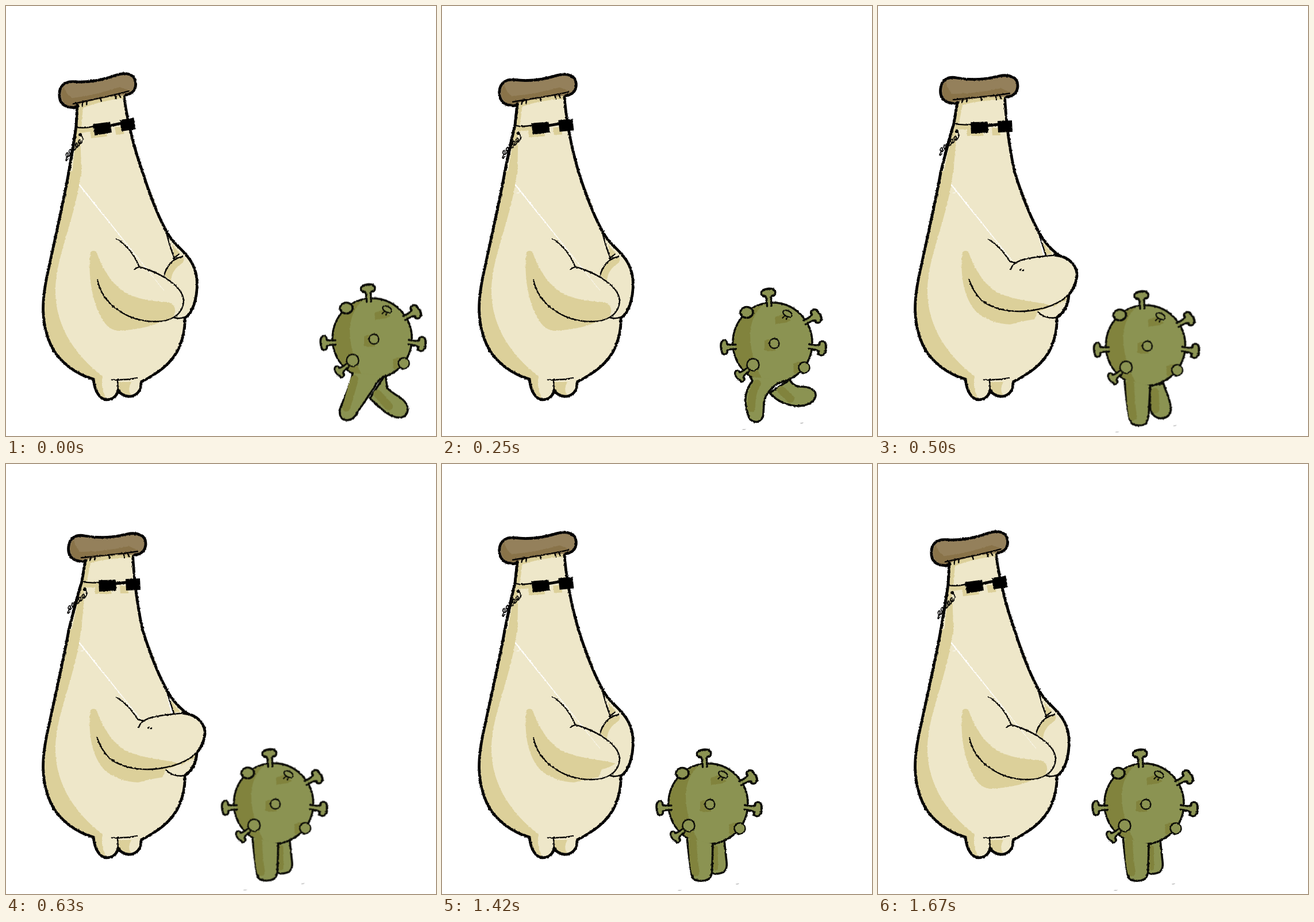
These frames come from a looping animation (748 px wide and 748 px high, 2.29 s). An HTML page without scripts:

```html
<!DOCTYPE html>
<html lang="en">
<head>
<meta charset="utf-8">
<title>Mushroom guard</title>
<style>
html, body { margin: 0; width: 100%; height: 100%; overflow: hidden; background: #fff; }
svg { display: block; width: 100%; height: 100%; }
path, ellipse { stroke-linecap: round; stroke-linejoin: round; }

.skin { fill: #eee7c9; }
.shade { fill: #dcd09a; }
.line { stroke: #050404; stroke-width: 4.8; }
.open { fill: none; }
.thin { fill: none; stroke: #050404; stroke-width: 2.4; }
.germ { fill: #8b9352; stroke: #0d0d08; stroke-width: 3.6; }
.fine { stroke-width: 2.3; }
.dark { fill: #81833d; }
.band { fill: none; stroke: #81833d; stroke-width: 14; }

/* every part switches hard inside one shared loop */
.lean, .mid, .up, .armsDown, .shadeLow, .shadeHigh, .later,
.walk, .stride, .kick, .pass, .step, .stand { animation: 2290ms step-end infinite; }
.lean { animation-name: lean; }
.mid { animation-name: mid; }
.up { animation-name: up; }
.armsDown { animation-name: armsDown; }
.shadeLow { animation-name: shadeLow; }
.shadeHigh { animation-name: shadeHigh; }
.later { animation-name: later; }
.walk { animation-name: walk; }
.stride { animation-name: stride; }
.kick { animation-name: kick; }
.pass { animation-name: pass; }
.step { animation-name: step; }
.stand { animation-name: stand; }

@keyframes lean { 0% { opacity: 1 } 10.917% { opacity: 0 } 69.432%, 100% { opacity: 1 } }
@keyframes mid { 0% { opacity: 0 } 10.917% { opacity: 1 } 16.594% { opacity: 0 } 62.009% { opacity: 1 } 69.432%, 100% { opacity: 0 } }
@keyframes up { 0% { opacity: 0 } 16.594% { opacity: 1 } 62.009%, 100% { opacity: 0 } }
@keyframes armsDown { 0% { opacity: 1 } 16.594% { opacity: 0 } 62.009%, 100% { opacity: 1 } }
@keyframes shadeLow { 0% { opacity: 1 } 16.594% { opacity: 0 } 65.502%, 100% { opacity: 1 } }
@keyframes shadeHigh { 0% { opacity: 0 } 16.594% { opacity: 1 } 65.502%, 100% { opacity: 0 } }
@keyframes later { 0% { opacity: 0 } 5.677%, 100% { opacity: 1 } }
@keyframes walk {
  0% { transform: translate(174px, -12.5px) }
  5.677% { transform: translate(143px, -9px) }
  10.917% { transform: translate(112px, -5px) }
  16.594% { transform: translate(57px, -1.5px) }
  21.834% { transform: translate(2.5px, -.5px) }
  32.751%, 100% { transform: none }
}
@keyframes stride { 0% { opacity: 1 } 5.677%, 100% { opacity: 0 } }
@keyframes kick { 0% { opacity: 0 } 10.917% { opacity: 1 } 16.594%, 100% { opacity: 0 } }
@keyframes pass { 0% { opacity: 0 } 5.677% { opacity: 1 } 10.917% { opacity: 0 } 16.594% { opacity: 1 } 21.834%, 100% { opacity: 0 } }
@keyframes step { 0% { opacity: 0 } 21.834% { opacity: 1 } 27.511%, 100% { opacity: 0 } }
@keyframes stand { 0% { opacity: 0 } 27.511%, 100% { opacity: 1 } }
</style>
</head>
<body>
<svg viewBox="0 0 748 748">
  <defs>
    <filter id="rough" filterUnits="userSpaceOnUse" x="0" y="0" width="748" height="748" color-interpolation-filters="sRGB">
      <feTurbulence type="fractalNoise" baseFrequency=".3" numOctaves="2" seed="4"/>
      <feDisplacementMap in="SourceGraphic" scale="2.8" xChannelSelector="R" yChannelSelector="G"/>
    </filter>
    <clipPath id="ball"><ellipse cx="463" cy="591" rx="67.5" ry="68.5"/></clipPath>
    <path id="spike" d="M-4 4C-4-6-4-8-6-11C-14-10-15-18-10-20C-4-22 6-23 10-20C15-17 13-10 6-11C4-8 4-6 4 4"/>
    <path id="body" d="M109 290C97 355 83 415 73 462C62 512 60 550 78 590C92 620 125 642 152 649C154 668 162 685 176 685C188 684 194 676 195 668C200 677 210 680 218 679C230 676 235 668 235 654C262 640 290 622 302 592C309 575 312 555 311 540"/>
    <path id="flank" d="M238 290C250 328 262 360 277 388"/>

    <g id="head">
      <path class="shade" d="M138 158L133 204L120 262L114 290L131 290L136 230L134 206L141 203L147 172Q180 163 219 163V152Z"/>
      <path class="shade" d="M132 204L161 206V214L136 215ZM155 212H163V221H183V226H155ZM198 212H209V220H213V225H199Z"/>
      <path fill="#94805b" d="M138 166L128 170C112 167 107 155 109 143C111 128 122 122 137 125C165 130 190 127 210 122C229 118 243 124 243 138C243 150 236 157 224 158Q175 158 138 166Z"/>
      <path fill="#897349" d="M118 131C107 145 113 165 127 167Q139 166 147 161Q185 156 220 155L231 151L214 143Q175 152 130 153Q120 145 118 131Z"/>
      <path class="line open" d="M139 168Q134 171 128 169C112 167 107 155 109 143C111 128 122 122 137 125C165 130 190 127 210 122C229 118 243 124 243 138C243 150 236 157 224 158"/>
      <path class="thin" d="M131 163Q150 161 180 158T229 152M148 162l-2 6M155 161l-1 6M179 158l1 6M205 157l1 6M212 156l2 5"/>
      <path class="thin" d="M131 204Q146 208 161 206"/>
      <path class="line open" d="M191 208L209 206"/>
      <path d="M161 202L191 201.500L192 220L162 222ZM208 200L233 199L234 219L209 220Z"/>
      <circle cx="137" cy="218" r="3"/>
      <path class="thin" style="stroke-width:1.800" d="M138 218q5 7 1 12c-2 6-9 3-6-2s5 2 0 7c-2 6-9 3-6-2s5 2 0 7c-2 6-9 3-6-2s5 2 0 7c-2 6-9 3-6-2s5 2 0 7c-2 6-9 3-6-2s5 2 0 7q-3 5-1 5l3-3"/>
    </g>
  </defs>

  <g filter="url(#rough)">
    <path class="skin" d="M109 286H238L277 388L311 540Z"/>
    <use class="skin" href="#body"/>
    <use class="skin" href="#flank"/>

    <g class="lean">
      <path class="skin line" d="M109 290C113 268 118 235 122 211L125 155L204 146C208 185 220 240 238 290"/>
      <use href="#head" transform="rotate(-6.5 187 290)"/>
      <path class="line open" d="M109 290C113 268 118 235 122 211L124 172"/>
    </g>
    <g class="mid">
      <path class="skin line" d="M109 290C114 266 121 230 127 208L133 153L212 148C215 190 224 243 238 290"/>
      <use href="#head" transform="rotate(-3.6 187 290)"/>
      <path class="line open" d="M109 290C114 266 121 230 127 208L131 170"/>
    </g>
    <g class="up">
      <path class="skin line" d="M109 290C116 262 125 225 132 205L141 150H220C223 210 230 255 238 290"/>
      <use href="#head"/>
      <path class="line open" d="M109 290C116 262 125 225 132 205L138 168"/>
    </g>

    <path class="shade" d="M110 288C98 355 84 415 74 462C63 512 61 550 79 590C93 619 126 641 153 648C155 667 162 680 174 683Q164 664 168 644C123 610 86 560 86 496C86 434 122 370 131 284Z"/>
    <path class="shade" d="M195 654H218Q211 666 217 677Q200 678 195 666Z"/>
    <use class="line open" href="#body"/>
    <use class="line open" href="#flank"/>
    <path class="thin" d="M195 669L194 652M184 650Q208 651 228 647"/>
    <path class="later" fill="none" stroke="#fff" d="M132 317h3M130 325h4"/>

    <g class="armsDown">
      <path class="skin" d="M277 388C288 412 303 419 316 436C329 452 334 472 332 494C330 518 322 536 311 543L290 542L270 480Z"/>
      <path class="line open" d="M277 388C288 412 303 419 316 436C329 452 334 472 332 494C330 518 322 536 311 543"/>
      <path class="shade" d="M275 468Q285 441 308 437Q313 444 300 452Q288 462 287 478ZM289 415L302 430L293 437Z"/>
    </g>
    <g class="up">
      <path class="skin line" d="M277 388C287 409 299 422 315 434L300 440"/>
      <path class="shade" d="M284 408L302 430L292 434Z"/>
      <path class="skin" d="M332 502C331 522 322 538 309 542Q290 545 277 531Z"/>
      <path class="thin" d="M309 542Q290 545 277 531"/>
      <path class="shade" d="M305 521L330 505Q328 516 318 516Q310 519 305 525Z"/>
      <path class="line open" d="M332 502C331 520 324 533 312 541"/>
      <path class="skin" d="M231 458C236 440 265 437 315 433C338 438 347 455 346 470C342 495 328 512 305 520C255 537 210 532 180 512Z"/>
      <path class="line open" d="M307 433C336 436 347 455 346 470C343 488 338 496 331 503"/>
    </g>

    <path class="shade shadeLow" d="M147 428Q156 421 160 435C172 467 190 487 207 498C232 512 260 514 282 515Q296 520 294 533L289 545L268 550Q242 562 197 565Q180 565 168 546C150 515 142 470 147 428Z"/>
    <path class="shade shadeHigh" d="M147 428Q156 421 160 435C172 467 190 487 207 498C232 510 260 513 285 517L302 521Q290 529 278 531L272 545Q250 548 230 554Q195 552 172 533C150 510 142 470 147 428Z"/>

    <g class="armsDown">
      <path class="thin" d="M192 405Q217 419 232 454M224 458Q230 452 240 456C275 468 306 488 309 511C309 536 288 549 260 549C215 549 168 522 159 476M275 468Q284 440 307 436M301 431L291 440M278 390Q284 416 293 439M292 542Q303 545 311 541"/>
    </g>
    <g class="up">
      <path class="thin" d="M192 406Q212 417 229 444L239 447M231 458C236 440 265 437 312 433M278 390L292 434M331 503Q315 518 290 525C245 537 205 531 180 512Q166 498 158 475M247 459l2-1M252 460l1 0"/>
    </g>
  </g>

  <g class="walk">
    <g filter="url(#rough)">
      <g class="stride">
        <path class="germ" d="M486 653L489 677C500 688 508 690 516 697C530 710 526 725 514 728C498 731 483 718 459 695Z"/>
        <path class="band" d="M472 687L492 709"/>
      </g>
      <g class="kick">
        <path class="germ" d="M493 655Q498 666 510 667C530 667 539 674 538 684C534 698 514 703 498 700Q474 696 458 678Z"/>
        <path class="band" d="M478 673L494 688"/>
      </g>
      <g class="pass">
        <path class="germ" d="M483 656Q484 671 490 682C503 696 505 706 499 715Q487 720 476 711Q466 700 455 685Z"/>
        <path class="band" d="M467 683L479 698"/>
      </g>
      <g class="step">
        <path class="germ" d="M471 661L494 657C498 672 506 682 507 702C506 713 500 717 491 718Q474 717 471 700Z"/>
        <path class="band" d="M479 672L480 702"/>
      </g>
      <g class="stand">
        <path class="germ" d="M471 661L491 655Q493 673 495 692C497 708 490 713 474 713L469 710Z"/>
        <path class="band" style="stroke-width:8" d="M476 668L476 703"/>
      </g>

      <ellipse class="germ" cx="463" cy="591" rx="69" ry="70"/>
      <g class="dark" clip-path="url(#ball)">
        <path d="M457 515H380V665H452C425 625 415 570 434 540Q441 528 457 515Z"/>
        <path d="M449 587Q457 583 467 585L468 604Q457 607 449 604ZM467 546L482 541L495 552L485 556L468 558ZM499 627L515 623L520 640L500 645Z"/>
      </g>
      <g class="germ">
        <use href="#spike" transform="translate(457 522) rotate(-4) scale(.95 1.15)"/>
        <use href="#spike" transform="translate(523 553) rotate(62) scale(.95 1.15)"/>
        <use href="#spike" transform="translate(531 598) rotate(98) scale(.95 1.15)"/>
        <use href="#spike" transform="translate(395 598) rotate(-92) scale(.95 1)"/>
        <use href="#spike" transform="translate(417 640) rotate(-128) scale(.85 .9)"/>
        <ellipse cx="418" cy="538" rx="11" ry="9.500"/>
      </g>
      <g class="germ fine">
        <circle cx="429" cy="629" r="10.500"/>
        <circle cx="466" cy="592" r="8.500"/>
        <circle cx="518" cy="634" r="9.500"/>
        <ellipse cx="489" cy="540" rx="8.500" ry="5" transform="rotate(28 489 540)"/>
        <path fill="none" d="M485 543l-4 4M489 545l-2 5"/>
      </g>

      <g class="stride">
        <path class="germ" d="M429 651C428 664 419 682 416 692L407 713C405 727 410 733 420 733Q432 732 438 718L466 677Q474 660 487 655"/>
        <path class="band" d="M432 662L418 711"/>
      </g>
      <g class="kick">
        <path class="germ" d="M424 650L428 657C418 670 415 684 416 695Q418 712 423 723Q430 730 438 728Q447 724 447 714L448 695Q450 682 459 673Q474 656 492 656"/>
        <path class="band" d="M436 662Q426 676 426 704"/>
      </g>
      <g class="pass">
        <path class="germ" d="M427 651L431 656C420 670 416 680 417 695L419 717Q425 729 438 728Q449 725 451 711L453 686Q466 668 484 657"/>
        <path class="band" d="M438 663Q424 682 428 711"/>
      </g>
      <g class="step">
        <path class="germ" d="M426 650Q429 680 432 702Q435 725 441 728Q453 733 464 727Q469 716 469 700L471 661"/>
        <path class="band" d="M436 658Q437 692 441 715"/>
      </g>
      <g class="stand">
        <path class="germ" d="M426 650Q429 678 432 700Q434 720 439 723Q452 728 464 722Q470 717 470 704L471 661"/>
        <path class="band" d="M436 658Q437 690 441 710"/>
      </g>
      <path class="later" fill="none" stroke="#999" d="M411 742l5-1M512 731l4-1"/>
    </g>
  </g>
</svg>
</body>
</html>
```
